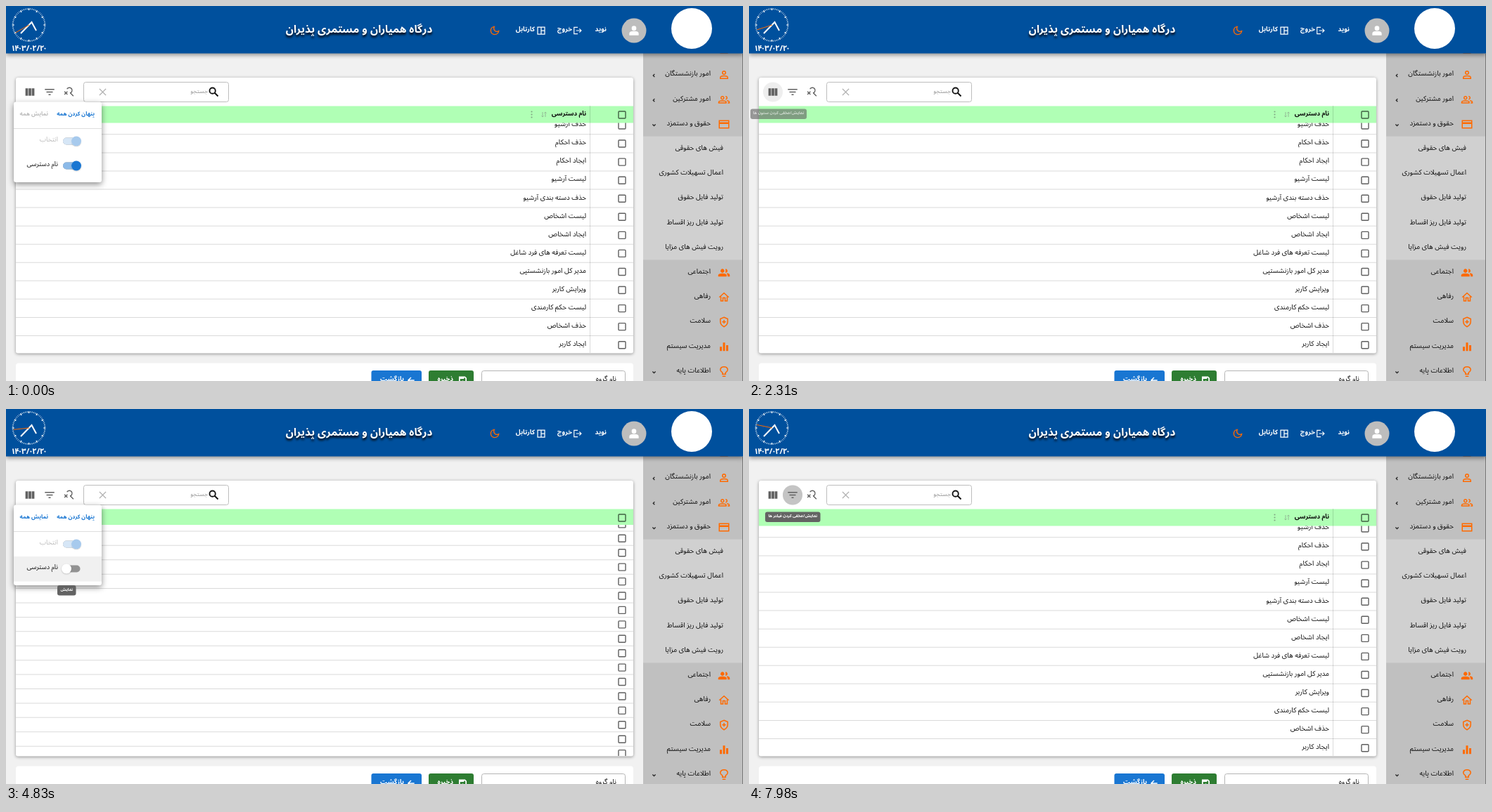
Write an HTML page with a canvas that moves like this. It is 1048 by 534 pixels and loops after 8000 ms.

```html
<!DOCTYPE html>
<html lang="fa">
<head>
<meta charset="utf-8">
<style>
  html, body { margin: 0; width: 100%; height: 100%; overflow: hidden; background: #f1f1f1; }
  canvas { display: block; }
</style>
</head>
<body>
<canvas id="stage" width="1048" height="534"></canvas>
<script>
const ctx = document.getElementById('stage').getContext('2d');
const LOOP = 8000;
const FAMILY = '"Noto Sans Arabic", "Noto Sans", "DejaVu Sans", sans-serif';
const ORANGE = '#ff6a00', BLUE = '#1976d2', INK = '#0c0c0c';

// Stroked icons on a 24 unit grid
const ICONS = {
  person: 'M12 5a3 3 0 1 1 0 6 3 3 0 1 1 0-6M5 19v-2c0-4 14-4 14 0v2z',
  people: 'M9 6a2.7 2.7 0 1 1 0 5.4 2.7 2.7 0 1 1 0-5.4M2 18.5v-1.5c0-3.5 14-3.5 14 0v1.5zM15 6a2.7 2.7 0 1 1 0 5.4M17.5 14c3 .5 4.5 1.5 4.5 3v1.5h-3',
  card: 'M3 5h18v14H3zM3 9h18M3 10.5h18',
  home: 'M3 12l9-8 9 8M6 10.5V19h4v-6h4v6h4v-8.5',
  shield: 'M12 3l7 3v5c0 5-3 8-7 10-4-2-7-5-7-10V6zM12 8v7M8.5 11.5h7',
  bars: 'M6 12v8M12 4v16M18 9v11',
  bulb: 'M9 17v-3C1.5 9 6 3 12 3s10.5 6 3 11v3zM9 21h6',
  logout: 'M12 4H3v16h9M8 12h12M16 7.5l4.5 4.5-4.5 4.5',
  board: 'M4 4h16v16H4zM12 4v16M12 12h8',
  moon: 'M11 4a8 8 0 1 0 9 9C14 16 8 11 11 4z',
  columns: 'M6 5v14M12 5v14M18 5v14',
  filter: 'M3 7h18M6 12h12M10 17h4',
  search: 'M9.5 4a5.5 5.5 0 1 1 0 11 5.5 5.5 0 1 1 0-11M14 14l6 6',
  searchOff: 'M8 6a5.5 5.5 0 1 1 6 8M15 14l6 6M3 11l6 6M9 11l-6 6',
  close: 'M5.5 5.5l13 13M18.5 5.5l-13 13',
  sort: 'M8 5v14M5 16l3 3 3-3M16 19V5M13 8l3-3 3 3',
  save: 'M4 4h13l3 3v13H4zM5 7h10M12 13v4',
  back: 'M20 12H5M12 5l-7 7 7 7',
  left: 'M14 7l-5 5 5 5',
  down: 'M7 10l5 5 5-5'
};
for (const name in ICONS) ICONS[name] = new Path2D(ICONS[name]);

const MENU = [
  ['امور بازنشستگان', 'person', 'left'], ['امور مشترکین', 'people', 'left'], ['حقوق و دستمزد', 'card', 'down'],
  ['فیش های حقوقی'], ['اعمال تسهیلات کشوری'], ['تولید فایل حقوق'], ['تولید فایل ریز اقساط'], ['رویت فیش های مزایا'],
  ['اجتماعی', 'people'], ['رفاهی', 'home'], ['سلامت', 'shield'], ['مدیریت سیستم', 'bars'], ['اطلاعات پایه', 'bulb', 'down']
];
const ROWS = ['حذف آرشیو', 'حذف احکام', 'ایجاد احکام', 'لیست آرشیو', 'حذف دسته بندی آرشیو', 'لیست اشخاص',
  'ایجاد اشخاص', 'لیست تعرفه های فرد شاغل', 'مدیر کل امور بازنشستپی', 'ویرایش کاربر', 'لیست حکم کارمندی',
  'حذف اشخاص', 'ایجاد کاربر'];
const TICKS = [770, 1750, 2730, 3850, 4900, 6020, 7070];

// Calibrate the type size to whichever Persian face is available
ctx.font = `500 100px ${FAMILY}`;
const EM = 90 / ctx.measureText(ROWS[4]).width * 100 / 10.5;

const ramp = (t, start, length) => Math.min(1, Math.max(0, (t - start) / length));
const pulse = (t, start, end, length) => ramp(t, start, length) * (1 - ramp(t, end, length));

function text(str, x, y, { size = 10.5, color = INK, weight = 500, align = 'right' } = {}) {
  ctx.font = `${weight} ${size * EM}px ${FAMILY}`;
  ctx.direction = 'rtl';
  ctx.textAlign = align;
  ctx.textBaseline = 'middle';
  ctx.fillStyle = color;
  ctx.fillText(str, x, y);
}

function box(x, y, w, h, fill, radius = 0) {
  ctx.fillStyle = fill;
  ctx.beginPath();
  ctx.roundRect(x, y, w, h, radius);
  ctx.fill();
}

function outline(x, y, w, h, color, radius, width = 1) {
  ctx.strokeStyle = color;
  ctx.lineWidth = width;
  ctx.beginPath();
  ctx.roundRect(x, y, w, h, radius);
  ctx.stroke();
}

function circle(x, y, r, fill) {
  ctx.fillStyle = fill;
  ctx.beginPath();
  ctx.arc(x, y, r, 0, 7);
  ctx.fill();
}

function line(color, width, ...points) {
  ctx.strokeStyle = color;
  ctx.lineWidth = width;
  ctx.beginPath();
  for (const [x, y] of points) ctx.lineTo(x, y);
  ctx.stroke();
}

function icon(name, x, y, color, { size = 17, width = 2, fill = false } = {}) {
  ctx.save();
  ctx.translate(x - size / 2, y - size / 2);
  ctx.scale(size / 24, size / 24);
  ctx.strokeStyle = ctx.fillStyle = color;
  ctx.lineWidth = width;
  if (fill) ctx.fill(ICONS[name]);
  ctx.stroke(ICONS[name]);
  ctx.restore();
}

function layer(alpha, draw) {
  if (alpha <= 0) return;
  ctx.save();
  ctx.globalAlpha = alpha;
  draw();
  ctx.restore();
}

function shadowed(color, blur, dy, draw) {
  ctx.save();
  ctx.shadowColor = color;
  ctx.shadowBlur = blur;
  ctx.shadowOffsetY = dy;
  draw();
  ctx.restore();
}

function sidebar() {
  box(906, 60, 142, 474, '#c0c0c0');
  box(906, 185.5, 142, 176, '#d0d0d0');
  icon('person', 1021, 62, ORANGE);
  MENU.forEach(([label, symbol, arrow], i) => {
    const y = 98 + i * 35.2;
    text(label, symbol ? 1002 : 1020, y);
    if (symbol) icon(symbol, 1021, y, ORANGE, { size: 18, width: symbol === 'bars' ? 4 : 2, fill: i === 8 });
    if (arrow) icon(arrow, 921.5, y + 1, '#222', { size: 10, width: 3 });
  });
  box(1047, 68, 1, 466, '#777');
}

function clock(t) {
  const polar = (a, r) => [32.5 + r * Math.sin(a), 27 - r * Math.cos(a)];
  for (let i = 0; i < 60; i++) {
    const a = i * Math.PI / 30, major = i % 5 === 0;
    line('#fff', major ? 1.6 : 0.9, polar(a, major ? 21 : 22), polar(a, 23.8));
  }
  const a = (240 + 6 * TICKS.filter(tick => t >= tick).length) * Math.PI / 180;
  line('#fff', 2, [21, 39], [36.5, 23], [43, 35]);
  line(ORANGE, 1, [33, 27], polar(a, 22));
}

function header(t) {
  shadowed('rgba(0,0,0,.4)', 6, 2, () => box(0, 0, 1048, 67.5, '#00509d'));
  clock(t);
  text('۱۴۰۳/۰۲/۲۰', 33, 62, { size: 12, weight: 700, color: '#fff', align: 'center' });
  shadowed('rgba(0,0,0,.9)', 3, 3, () =>
    text('درگاه همیاران و مستمری پذیران', 502, 36, { size: 16.2, weight: 600, color: '#fff', align: 'center' }));
  const white = { size: 9.9, weight: 700, color: '#fff' };
  icon('moon', 695, 35, ORANGE);
  text('کارتابل', 752, 35, white);
  icon('board', 761, 35, '#fff', { size: 15 });
  text('خروج', 805, 35, white);
  icon('logout', 813, 35, '#fff', { size: 14 });
  text('نوید', 854, 35, white);
  circle(893, 35, 17.5, '#bdbdbd');
  icon('person', 893, 35, '#fff', { size: 20, fill: true });
  circle(975, 32, 29, '#fff');
}

function toolbar(columnHover, filterHover, filterPress) {
  layer(columnHover, () => circle(34, 122.5, 14, '#eee'));
  layer(filterHover, () => circle(62, 122.5, 14, '#eee'));
  layer(filterPress, () => circle(62, 122.5, 14, '#c4c4c4'));
  icon('columns', 34, 122.5, '#616161', { size: 18, width: 5 });
  icon('filter', 62, 122.5, '#616161', { size: 18 });
  icon('searchOff', 89.5, 122.5, '#616161', { size: 17 });
  outline(110.5, 108.5, 206, 28, '#bdbdbd', 3);
  icon('close', 137.5, 122.5, '#aaa', { width: 1.8 });
  text('جستجو', 287, 122.5, { size: 9, color: '#949494' });
  icon('search', 295.5, 122.5, '#111', { size: 18, width: 2.5 });
}

function table(showNames) {
  const step = showNames ? 26.06 : 20.42;
  const first = showNames ? 169.8 : 163.7;
  const headHeight = showNames ? 24 : 22.5;
  ctx.save();
  ctx.beginPath();
  ctx.rect(14, 142, 878, 352);
  ctx.clip();
  for (let i = 0; first + i * step < 505; i++) {
    const y = first + i * step;
    outline(871, y - 4.8, 10, 10, '#5f5f5f', 1, 1.4);
    box(14, y + step / 2 - 0.5, 878, 1, '#dadada');
    if (showNames && ROWS[i]) text(ROWS[i], 825, y);
  }
  box(14, 142.5, 878, headHeight, '#b0ffb5');
  outline(871, 150, 10, 10, '#3f6042', 1, 1.4);
  if (showNames) {
    box(830, 142, 1, 352, 'rgba(0,0,0,.14)');
    text('نام دسترسی', 825, 154.5, { size: 9.5, weight: 700 });
    icon('sort', 765, 154.5, '#91b994', { size: 12 });
    for (const y of [150.5, 154.5, 158.5]) circle(747.5, y, 1.1, '#82a985');
  }
  ctx.restore();
}

function footer() {
  const label = { size: 9.9, weight: 700, color: '#fff' };
  box(14, 508.5, 878, 30, '#fff', 4);
  outline(676.5, 519.5, 204, 30, '#b5b5b5', 3);
  text('نام گروه', 868, 532.5);
  box(601, 519, 64, 30, '#2e7d32', 3);
  icon('save', 649.5, 533, '#fff', { size: 14, width: 3 });
  text('ذخیره', 636, 532.5, label);
  box(519.5, 519, 71.5, 30, BLUE, 3);
  icon('back', 576, 533, '#fff', { size: 14, width: 2.5 });
  text('بازگشت', 566, 532.5, label);
}

function tooltip(label, x, y, w, alpha) {
  layer(alpha, () => {
    box(x, y, w, 14.5, '#636363', 3);
    text(label, x + w / 2, y + 7, { size: 6.2, weight: 600, color: '#fff', align: 'center' });
  });
}

function toggle(y, on, disabled) {
  const x = 86 + 14 * on;
  box(81, y - 5, 24.5, 10, '#929292', 5);
  layer(on, () => box(81, y - 5, 24.5, 10, disabled ? '#d6e6f6' : '#8cbae8', 5));
  shadowed('rgba(0,0,0,.22)', disabled ? 1 : 2, 0.7, () => circle(x, y, 7, '#fff'));
  layer(on, () => circle(x, y, 7, disabled ? '#a7caed' : BLUE));
}

function columnPanel(open, on, highlight) {
  layer(open, () => {
    const scale = 0.75 + 0.25 * open;
    ctx.translate(34, 137);
    ctx.scale(scale, scale);
    ctx.translate(-34, -137);
    shadowed('rgba(0,0,0,.45)', 9, 3, () => box(11, 136.5, 125, 114.5, '#fff', 3));
    const link = { size: 8.4, weight: 600 };
    text('پنهان کردن همه', 126, 154.5, { ...link, color: BLUE });
    text('نمایش همه', 60, 154.5, { ...link, color: on > 0.5 ? '#bbb' : BLUE });
    box(11, 174, 125, 1, '#dedede');
    layer(open * highlight, () => box(11, 210, 125, 35.5, '#f0f0f0'));
    text('انتخاب', 74, 191.5, { size: 10, color: '#bcbcbc' });
    text('نام دسترسی', 74, 227, { size: 9.8 });
    toggle(192.5, 1, true);
    toggle(227.5, on, false);
  });
}

function draw(t) {
  const HIDE = 4340, SHOW = 4900;
  const showNames = t < HIDE || t >= SHOW;
  const on = 1 - pulse(t, HIDE, SHOW, 140);
  const open = t < 2300 ? 1 - ramp(t, 1500, 180) : t < 6300 ? ramp(t, 2360, 260) : 0;

  box(0, 0, 1048, 534, '#f1f1f1');
  sidebar();
  shadowed('rgba(0,0,0,.4)', 4, 1, () => box(14, 102, 878, 392.5, '#fff', 3));
  toolbar(pulse(t, 1800, 2380, 150), ramp(t, 6510, 150), ramp(t, 6790, 350));
  table(showNames);
  footer();
  header(t);

  tooltip('نمایش/مخفی کردن ستون ها', 2, 146.5, 80, pulse(t, 1950, 2240, 190));
  tooltip('نمایش/مخفی کردن فیلتر ها', 23, 146.5, 78.5, ramp(t, 6650, 200));
  columnPanel(open, on, t > 2300 ? 1 - ramp(t, 5390, 140) : 0);
  tooltip(showNames ? 'مخفی' : 'نمایش', 73, 251, 26.5, pulse(t, 3740, 5390, 200));
}

function frame(now) {
  draw(now % LOOP);
  requestAnimationFrame(frame);
}
requestAnimationFrame(frame);
</script>
</body>
</html>
```
